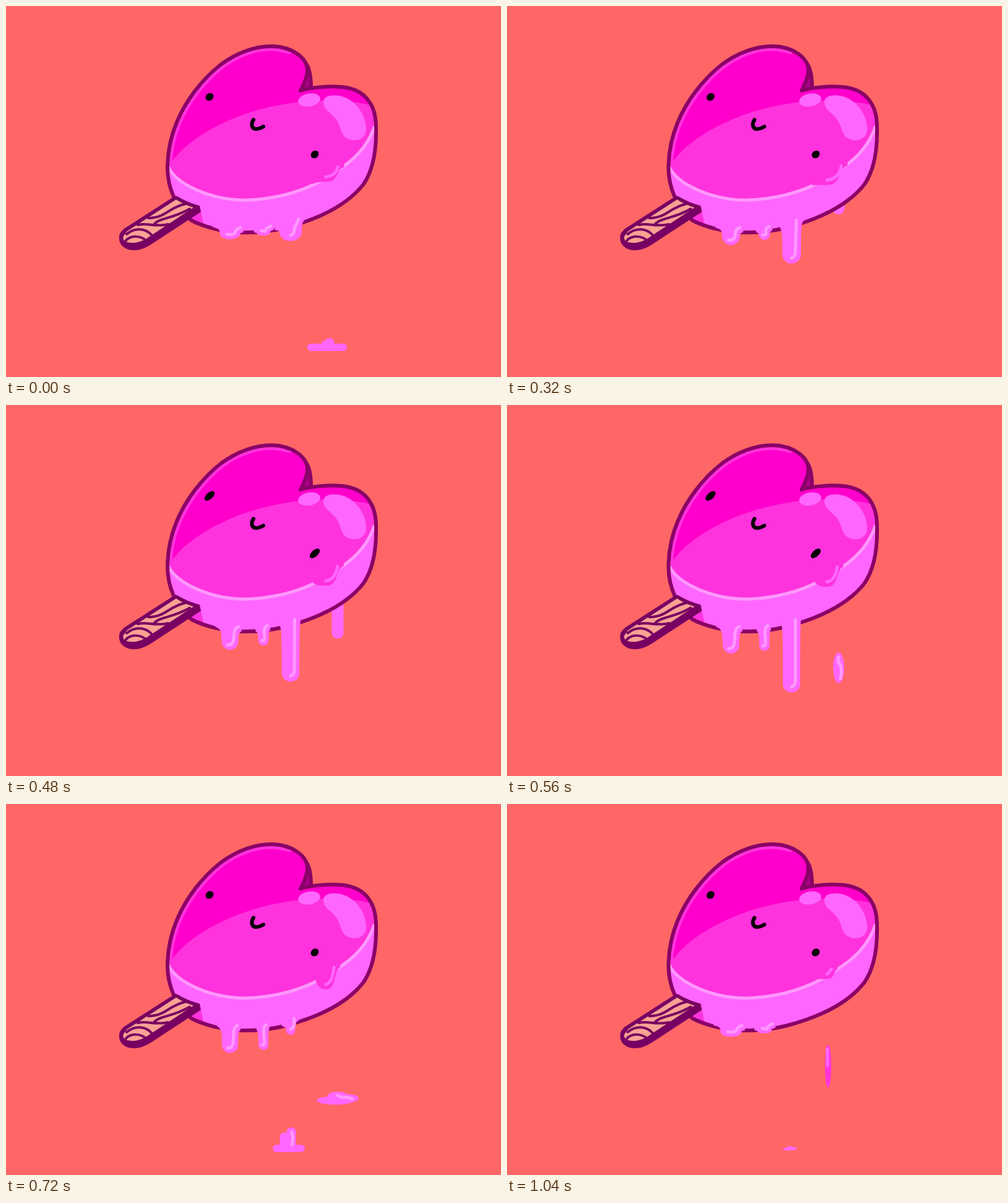
Write an HTML page that moves like this. It is 800 by 600 pixels and loops after 1.12 s.

```html
<!DOCTYPE html>
<html lang="en">
<head>
<meta charset="utf-8">
<title>Melting heart lolly</title>
<style>
  html, body { margin: 0; width: 100%; height: 100%; overflow: hidden; background: #ff6666; }
  svg { display: block; width: 800px; height: 600px; }
  .line { fill: none; stroke-linecap: round; stroke-linejoin: round; }
  .rim { stroke: #8a0066; stroke-width: 6; }
  .shine { stroke: #ff99ff; stroke-width: 5; }
  .soft { stroke: #ff66ff; stroke-width: 5; }
  .side { fill: #ff66ff; }
  .face { fill: #ff33dd; }
</style>
</head>
<body>
<svg viewBox="0 0 800 600">
  <defs>
    <path id="heart" d="M261 262C261 237 266 212 276 188C290 154 316 119 348 94C376 74 402 65 430 65C463 66 487 84 487 104
      C487 118 479 130 476 137C490 132 518 129 543 131C577 134 598 156 598 196C599 233 594 264 578 288C550 324 500 346 450 359
      C400 371 345 369 300 347C274 326 261 292 261 262Z"/>
    <clipPath id="inside"><use href="#heart"/></clipPath>
  </defs>

  <path id="back" class="side"/>

  <path class="rim" fill="#aa0088" stroke-linejoin="round" d="M484 92C491 100 493 116 493 133L478 136Z"/>
  <use href="#heart" class="face"/>
  <g clip-path="url(#inside)">
    <path fill="#ff00cc" d="M269 251C300 206 400 152 520 153C556 153 580 157 602 164V50H250V251Z"/>
    <path class="line" stroke="#ff33dd" stroke-width="15" d="M261 262C261 237 266 212 276 188C290 154 316 119 348 94C376 74 402 65 430 65Q445 66 457 70"/>
    <path class="side" d="M260 256C275 288 330 314 388 314C440 312 480 298 505 285C545 262 580 240 595 196L620 400H250Z"/>
    <path class="line shine" d="M262 260C275 288 330 314 388 314C440 312 480 298 505 285C545 262 580 240 595 196"/>
    <path class="face" d="M294 346L314 328L319 352Z"/>
  </g>
  <ellipse class="side" cx="490" cy="152" rx="18" ry="10.5" transform="rotate(-10 490 152)"/>
  <path class="side" d="M513 157C512 147 522 143 537 145C560 148 580 170 582 196C583 212 572 218 561 217C543 215 543 203 537 189C530 174 514 170 513 157Z"/>
  <use href="#heart" class="line rim"/>

  <path id="drips" class="side"/>
  <path id="dripGloss" class="line shine"/>
  <path id="tear" class="face"/>
  <path id="tearGloss" class="line soft"/>
  <path id="splash" class="side"/>
  <path id="splashGloss" class="line shine"/>
  <path id="pinkDrop" class="face"/>
  <path id="pinkGloss" class="line soft"/>

  <path fill="#780062" d="M183 372Q183 367 191 360L272 308Q275 306 279 309Q294 318 313 323L315 333L240 382C224 393 212 397 198 394C186 390 182 382 183 372Z"/>
  <path fill="#f8a294" d="M190 372L196 364L275 313Q287 321 303 326L233 372C220 382 206 385 196 382C190 380 188 376 190 372Z"/>
  <g class="line" stroke="#780062" stroke-width="4">
    <path d="M194 379C203 370 217 372 225 378"/>
    <path d="M195 369C209 357 226 360 235 370"/>
    <path d="M213 354C230 350 238 358 262 353"/>
    <path d="M230 343C258 343 262 326 290 320"/>
    <path d="M240 352C250 342 270 344 297 328"/>
  </g>

  <ellipse class="eye" transform="translate(329 147) rotate(-43)"/>
  <ellipse class="eye" transform="translate(499 240) rotate(-43)"/>
  <path class="line" stroke="#000" stroke-width="6" d="M400 184C396 190 396 198 404 199Q409 199 416 195"/>
</svg>
<script>
const STEP = 80, COUNT = 14;
const $ = id => document.getElementById(id);
const eyes = document.querySelectorAll('.eye');
const mix = (a, b, k) => a + (b - a) * k;
const since = (start, step) => (step - start + COUNT) % COUNT;

// Each drip swells for `span` steps, then springs back over three.
const drips = [
  { x: 362, start: 11, span: 11, power: 2.5, x0: [330, 339], x1: [388, 380], w: [20, 13], y: [376, 409], stub: [13, 376] },
  { x: 416, start: 11, span: 11, power: 3.7, x0: [397, 404], x1: [440, 426], w: [14, 8], y: [371, 409], stub: [8, 371] },
  { x: 460, start: 0, span: 7, power: 1.5, x0: [434, 444], x1: [492, 475], w: [18, 14], y: [380, 465], stub: [7.5, 360], long: true }
];

// Loose drops: fall for one step, splash, then shrink as a puddle.
const drops = [
  { x: 536, start: 7, air: 425, rx: 9, ry: 25, floor: 476, foot: 22, tall: 38, pool: 34 },
  { x: 457, start: 8, air: 470.5, rx: 13.5, ry: 28, floor: 557, foot: 26, tall: 34, pool: 46 },
  { x: 519, start: 13, air: 424, rx: 5, ry: 35, floor: 552, foot: 32, tall: 15, pool: 20, pink: true }
];

const rimY = x => 366 - 0.0024 * (x - 392) ** 2;
const edgeY = x => 286 - 0.55 * (x - 500);

function dripPose(d, step) {
  const age = since(d.start, step), k = Math.min(1, age / d.span);
  const at = ([a, b]) => mix(a, b, Math.sqrt(k));
  const pose = { x: d.x, x0: at(d.x0), x1: at(d.x1), w: at(d.w), y: mix(...d.y, k ** d.power), long: d.long };
  if (age > d.span) {
    const left = 1 - (age - d.span) / 3;
    if (left <= 0) return null;
    const [w, base] = d.stub;
    Object.assign(pose, { w, y: base + 40 * left, x0: mix(d.x - w, pose.x0, 0.8), x1: mix(d.x + w, pose.x1, 0.8) });
  }
  return pose;
}

function dripShape({ x, x0, x1, w, y }) {
  const y0 = rimY(x0), y1 = rimY(x1);
  const ry = Math.min(w, (y - Math.max(y0, y1)) * 0.75), end = y - ry;
  return `M${x0} ${y0 - 12}V${y0}C${x - w} ${y0 + 2} ${x - w} ${(y0 + end) / 2} ${x - w} ${end}` +
    `A${w} ${ry} 0 0 0 ${x + w} ${end}C${x + w} ${(y1 + end) / 2} ${x + w} ${y1 + 2} ${x1} ${y1}V${y1 - 12}Z`;
}

function dripGloss({ x, x1, w, y, long }) {
  if (long) {
    const gx = mix(x, x1, 0.4);
    return `M${x} ${y - 9}Q${x + 6} ${y - 11} ${x + 6} ${y - 20}L${gx} ${rimY(gx) - 6}`;
  }
  const gx = x1 - 5;
  return `M${x - w * 0.3} ${y - 8}C${x + w} ${y - 6} ${x + w - 14} 362 ${gx} ${rimY(gx) - 7}`;
}

// The runny face edge bulges early, then narrows and stretches.
function tearPose(step) {
  const age = since(13, step), k = age / 13;
  const bulge = age / 3 * Math.exp(1 - age / 3);
  return { x: 518, x0: 505 - 14 * bulge, x1: 534 + 19 * bulge, w: 12 + 13 * bulge, y: 283 + 17 * k + 30 * k ** 8 };
}

function tearShape({ x, x0, x1, w, y }) {
  const y0 = edgeY(x0), y1 = edgeY(x1);
  return `M${x0} ${y0}C${x - w} ${y0} ${x - w} ${y} ${x} ${y}` +
    `C${x + w} ${y} ${x + w * 0.7} ${y1 + 4} ${x1} ${y1}V${y1 - 9}L${x0} ${y0 - 9}Z`;
}

const tearGloss = ({ x, x1, y }) =>
  `M${x - 1} ${y - 8}Q${x1 - 13} ${y - 10} ${x1 - 10} ${edgeY(x1)}`;

const oval = (x, y, rx, ry) =>
  `M${x - rx} ${y}a${rx} ${ry} 0 1 1 ${2 * rx} 0a${rx} ${ry} 0 1 1 ${-2 * rx} 0Z`;

const pill = (x, y, w, h, r) =>
  `M${x - w} ${y + r}a${r} ${r} 0 0 1 ${r} ${-r}H${x + w - r}a${r} ${r} 0 0 1 ${r} ${r}V${y + h - r}` +
  `a${r} ${r} 0 0 1 ${-r} ${r}H${x - w + r}a${r} ${r} 0 0 1 ${-r} ${-r}Z`;

// Two columns rising from a flat foot
const crown = (x, y, w, tall) =>
  pill(x, y - 6, w, 12, 6) + pill(x + 4, y - tall, 7.5, tall + 4, 7) +
  pill(x + 2 - tall * 0.28, y - tall * 0.75, 7, tall * 0.75 + 4, 6);

const puddle = (x, y, w) =>
  oval(x - w * 0.1, y + w * 0.1, w * 0.9, w * 0.2) + oval(x + w * 0.45, y, w * 0.55, w * 0.2) + oval(x, y - w * 0.08, w * 0.5, w * 0.24);

function dropParts(d, step) {
  const { x, floor } = d, age = since(d.start, step);
  if (age === 0) {
    const { air, rx, ry } = d;
    const gloss = d.pink ? `M${x - 1} ${air - 28}v27` : `M${x} ${air - ry * 0.7}q-3 8 3 13q3 10 0 22`;
    return { shape: oval(x, air, rx, ry), gloss, falling: true };
  }
  if (age === 1)
    return { shape: crown(x, floor, d.foot, d.tall), gloss: d.pink ? '' : `M${x + 5} ${floor - d.tall + 8}q3 10 0 20` };
  const w = d.pool * (1 - (age - 2) / 4);
  if (w <= 0 || (d.pink && age > 3)) return { shape: '', gloss: '' };
  const gloss = d.pink || w < 14 ? '' : `M${x} ${floor - w * 0.14}q${w * 0.2} ${w * 0.14} ${w * 0.4} ${w * 0.08}l${w * 0.3} ${w * 0.08}`;
  return { shape: d.pink ? pill(x, floor - 4, w * 0.6, 8, 4) : puddle(x, floor, w), gloss };
}

const put = (id, d) => $(id).setAttribute('d', d);
const join = (list, part) => list.map(part).join('');

function draw(step) {
  const poses = drips.map(d => dripPose(d, step)).filter(Boolean);
  put('drips', join(poses, dripShape));
  put('dripGloss', join(poses, dripGloss));

  const tear = tearPose(step);
  put('tear', tearShape(tear));
  put('tearGloss', tearGloss(tear));

  const hanging = step >= 4 && step < 7;
  put('back', hanging ? pill(536, 300, 9.5, 37 + 20.5 * (step - 4), 9) : '');

  const parts = drops.map(d => ({ ...dropParts(d, step), pink: d.pink }));
  const pink = parts.filter(p => p.pink && p.falling), rest = parts.filter(p => !pink.includes(p));
  put('splash', join(rest, p => p.shape));
  put('splashGloss', join(rest, p => p.gloss));
  put('pinkDrop', join(pink, p => p.shape));
  put('pinkGloss', join(pink, p => p.gloss));

  const squint = step === 6 || step === 7;
  for (const eye of eyes) {
    eye.setAttribute('rx', squint ? 10 : 6.8);
    eye.setAttribute('ry', squint ? 5.2 : 5.8);
  }
}

let shown = -1;
function tick() {
  const step = Math.floor(performance.now() / STEP) % COUNT;
  if (step !== shown) draw(shown = step);
  requestAnimationFrame(tick);
}
tick();
</script>
</body>
</html>
```
